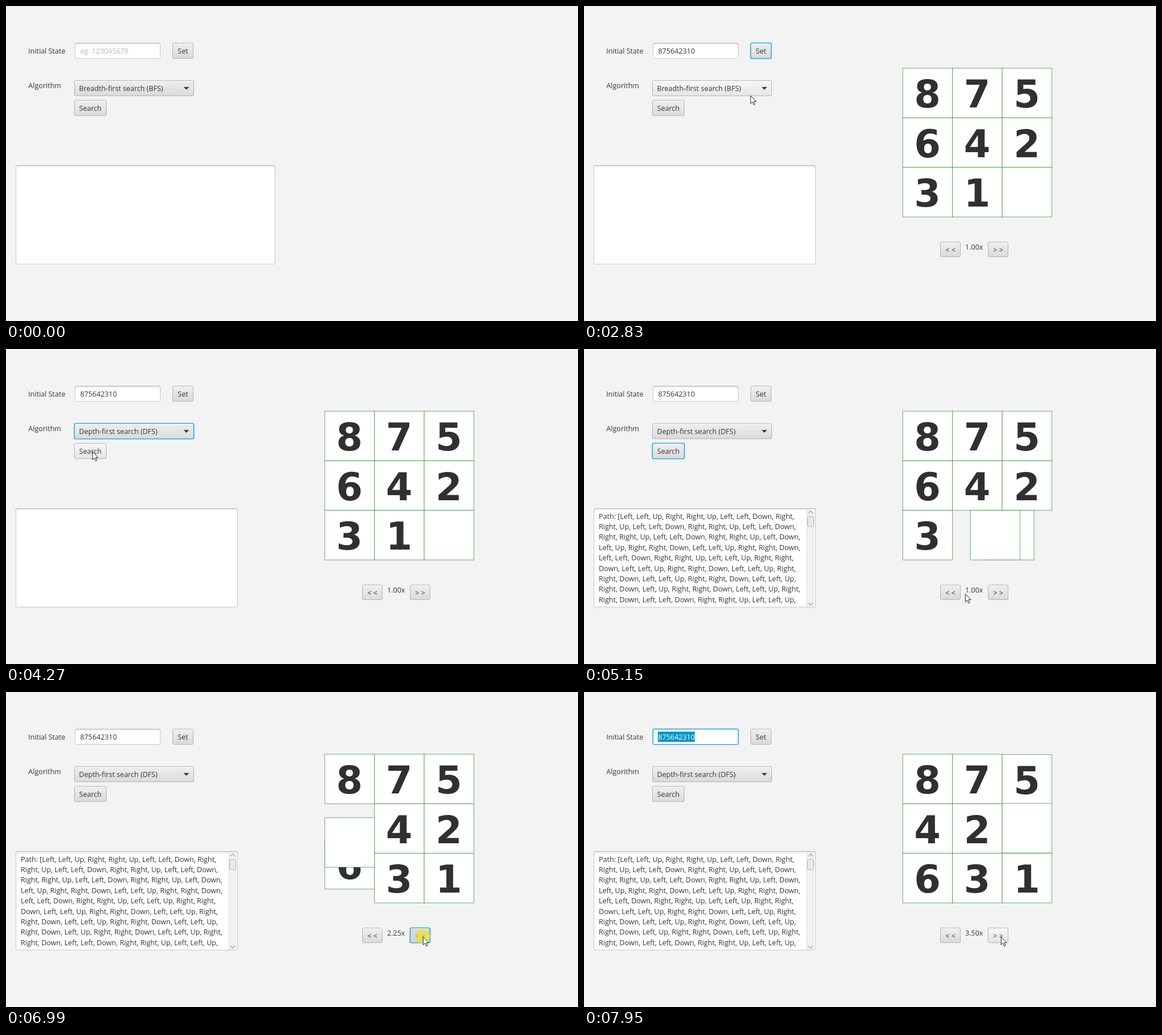
An HTML page with a canvas that plays this animation: 1007 px wide and 556 px high, repeating every 8000 ms.

```html
<!DOCTYPE html>
<html lang="en">
<head>
<meta charset="utf-8">
<title>8-puzzle solver</title>
<style>
html, body { margin: 0; width: 100%; height: 100%; overflow: hidden; background: #f3f3f3; }
canvas { display: block; }
</style>
</head>
<body>
<canvas id="stage" width="1007" height="556"></canvas>
<script>
const c = document.getElementById('stage').getContext('2d');
const LOOP = 8000, INK = '#353535', ACCENT = '#0096c9';
const UI = '"Open Sans", "Noto Sans", sans-serif';
const START = '875642310';
const ITEMS = ['Breadth-first search (BFS)', 'Depth-first search (DFS)', 'A* (Manhattan)', 'A* (Euclidean)'];
const PATH = `Path: [Left, Left, Up, Right, Right, Up, Left, Left, Down, Right,
Right, Up, Left, Left, Down, Right, Right, Up, Left, Left, Down,
Right, Right, Up, Left, Left, Down, Right, Right, Up, Left, Down,
Left, Up, Right, Right, Down, Left, Left, Up, Right, Right, Down,
Left, Left, Down, Right, Right, Up, Left, Left, Up, Right, Right,
Down, Left, Left, Up, Right, Right, Down, Left, Left, Up, Right,
Right, Down, Left, Left, Up, Right, Right, Down, Left, Left, Up,
Right, Down, Left, Up, Right, Right, Down, Left, Left, Up, Right,
Right, Down, Left, Left, Down, Right, Right, Up, Left, Left, Up,`.split('\n');

// time, x, y of the pointer tip
const POINTER = [
  [70, 667, 448], [620, 200, 78], [1170, 200, 78], [1650, 311, 79], [2200, 311, 79],
  [2440, 358, 112], [2830, 293, 158], [2990, 288, 153], [3150, 288, 153], [3630, 225, 196],
  [3950, 225, 196], [4270, 152, 181], [4670, 152, 181], [5150, 671, 432], [5470, 734, 432]
];
const PRESSES = [[700, 780], [1960, 2200], [3070, 3150], [3870, 3950], [4350, 4430],
  [5590, 5698], [6590, 6727], [6950, 7209]];
const FOCUS = [[0, ''], [700, 'field'], [1960, 'set'], [3070, 'combo'], [4350, 'search'],
  [5590, 'faster'], [7209, 'field']];
const SPEED = [[4354, 1], [5698, 1.5], [6727, 2.25], [7209, 3.5]];
const MOVE_MS = 1300, MOVES = [-1, -1, -3, 1, 1, -3];

const latest = (keys, t) => keys.filter(k => k[0] <= t).pop();

function pointerAt(t) {
  const i = POINTER.findIndex(k => k[0] > t);
  if (i < 0) return POINTER[POINTER.length - 1].slice(1);
  const [t0, x0, y0] = POINTER[i - 1], [t1, x1, y1] = POINTER[i];
  const p = (t - t0) / (t1 - t0), e = p * p * (3 - 2 * p);
  return [x0 + (x1 - x0) * e, y0 + (y1 - y0) * e];
}

// number of slides done, with fraction
function slides(t) {
  return SPEED.reduce((sum, [from, rate], i) => {
    const end = i + 1 < SPEED.length ? SPEED[i + 1][0] : Infinity;
    return sum + Math.max(0, Math.min(t, end) - from) * rate;
  }, 0) / MOVE_MS;
}

function easeBoth(p) {
  if (p < .2) return 3.125 * p * p;
  return p <= .8 ? 1.25 * p - .125 : 1 - 3.125 * (1 - p) ** 2;
}

function text(s, x, y, color = INK, align = 'left') {
  c.font = `12.57px ${UI}`;
  c.fillStyle = color;
  c.textAlign = align;
  c.fillText(s, x, y);
}

function round(x, y, w, h, r) {
  c.beginPath();
  c.roundRect(x, y, w, h, r);
}

function gradient(y, h, ...stops) {
  const g = c.createLinearGradient(0, y, 0, y + h);
  stops.forEach(([at, color]) => g.addColorStop(at, color));
  return g;
}

function outline(x, y, w, h, inset, width, color) {
  round(x + inset, y + inset, w - 2 * inset, h - 2 * inset, 3 - inset);
  c.strokeStyle = color;
  c.lineWidth = width;
  c.stroke();
}

function border(x, y, w, h, focused, color) {
  if (focused) {
    outline(x, y, w, h, -.8, 1, 'rgba(3,158,211,.14)');
    outline(x, y, w, h, .4, 1.4, '#1ba6d6');
  } else outline(x, y, w, h, .5, 1, color);
}

function button(x, y, w, h, label, focused, mouse) {
  const hover = mouse && mouse.x >= x && mouse.x <= x + w && mouse.y >= y && mouse.y <= y + h;
  const [top, bottom] = !hover ? ['#efefef', '#dadada'] : mouse.down ? ['#dcdcdc', '#d2d2d2'] : ['#f7f7f7', '#e5e5e5'];
  round(x, y, w, h, 3);
  c.fillStyle = gradient(y, h, [0, top], [1, bottom]);
  c.fill();
  c.fillStyle = 'rgba(255,255,255,.7)';
  c.fillRect(x + 2, y + 1, w - 4, 1);
  border(x, y, w, h, focused, '#b4b4b4');
  if (label) text(label, x + w / 2, y + 18.7, INK, 'center');
}

function input(x, y, w, h, focused) {
  round(x, y, w, h, 3);
  c.fillStyle = gradient(y, 5, [0, '#e4e4e4'], [1, '#fff']);
  c.fill();
  border(x, y, w, h, focused, gradient(y, 8, [0, '#b2b2b2'], [1, '#c8c8c8']));
}

function chevron(y, dir) {
  c.beginPath();
  c.moveTo(395, y + 2 * dir);
  c.lineTo(399, y - 2 * dir);
  c.lineTo(403, y + 2 * dir);
  c.strokeStyle = '#94aa97';
  c.lineWidth = 1.3;
  c.stroke();
}

function output() {
  PATH.forEach((line, i) => text(line, 26, 299.5 + 18.4 * i));
  c.fillStyle = '#f0f1f0';
  c.fillRect(392, 282, 14, 173);
  c.fillStyle = '#d9dbd9';
  c.fillRect(392, 282, 1, 173);
  round(393.5, 295.5, 11, 18, 2.5);
  c.fillStyle = '#e6ebe7';
  c.fill();
  c.strokeStyle = '#b0bbb2';
  c.lineWidth = 1;
  c.stroke();
  chevron(288, 1);
  chevron(450, -1);
}

function tile(col, row, digit) {
  const x = 561.2 + 87.5 * col, y = 109.8 + 87.5 * row;
  c.fillStyle = '#fff';
  c.fillRect(x, y, 87.5, 87.5);
  c.strokeStyle = 'rgba(0,128,0,.6)';
  c.lineWidth = 1;
  c.strokeRect(x, y, 87.5, 87.5);
  if (digit === '0') return;
  c.font = 'bold 67px "DejaVu Sans", Verdana, sans-serif';
  c.textAlign = 'center';
  c.fillStyle = '#303030';
  c.fillText(digit, x + 43.4, y + 69.2);
}

function board(t) {
  const cells = [...START], n = t < 4670 ? 0 : slides(t), done = Math.floor(n);
  let gap = 8;
  const place = i => [i % 3, Math.floor(i / 3)];
  for (const step of MOVES.slice(0, done)) {
    [cells[gap], cells[gap + step]] = [cells[gap + step], '0'];
    gap += step;
  }
  const next = gap + (MOVES[done] || 0), p = easeBoth(n - done);
  const [x0, y0] = place(gap), [x1, y1] = place(next);
  const dx = (x1 - x0) * p, dy = (y1 - y0) * p;
  cells.forEach((d, i) => {
    const [x, y] = place(i);
    if (i === next && i !== gap) tile(x - dx, y - dy, d);
    else if (i !== gap) tile(x, y, d);
  });
  tile(x0 + dx, y0 + dy, '0');
}

function popup(y) {
  c.save();
  c.shadowColor = 'rgba(0,0,0,.3)';
  c.shadowBlur = 8;
  c.shadowOffsetY = 2;
  c.fillStyle = '#fff';
  c.fillRect(120, 159, 210, 104);
  c.restore();
  c.strokeStyle = '#c4c4c4';
  c.lineWidth = 1;
  c.strokeRect(120.5, 159.5, 209, 103);
  const over = Math.floor((y - 160) / 25.5);
  ITEMS.forEach((item, i) => {
    const top = 160 + 25.5 * i;
    if (i === over) {
      c.fillStyle = ACCENT;
      c.fillRect(121, top, 208, 25.5);
    }
    text(item, 129, top + 17, i === over ? '#fff' : INK);
  });
}

function pointer(x, y) {
  c.save();
  c.translate(x, y);
  c.lineWidth = 1;
  c.strokeStyle = '#26262c';
  c.beginPath();
  if (x > 122 && x < 271 && y > 66 && y < 92) {
    [[-3, -8, 3, -8], [0, -8, 0, 8], [-3, 8, 3, 8]].forEach(([a, b, d, e]) => {
      c.moveTo(a + .5, b + .5);
      c.lineTo(d + .5, e + .5);
    });
  } else {
    [[0, 0], [0, 14], [3.2, 11], [5.6, 16.3], [7.8, 15.3], [5.5, 10.2], [9.8, 10.2]]
      .forEach(([a, b]) => c.lineTo(a + .3, b + .3));
    c.closePath();
    c.fillStyle = '#fff';
    c.fill();
  }
  c.stroke();
  c.restore();
}

function field(t, focused) {
  input(121, 65, 151, 28, focused);
  if (t < 700) text('eg. 123045678', 130.5, 84, '#b8b8b4');
  else if (t >= 7209) {
    c.fillStyle = ACCENT;
    c.fillRect(130, 70, 65, 18);
    text(START, 130.5, 84, '#fff');
  } else {
    if (t >= 1170) text(START, 130.5, 84);
    if (focused) {
      c.fillStyle = INK;
      c.fillRect(t >= 1170 ? 196 : 130, 71, 1, 17);
    }
  }
}

function draw(t) {
  const focus = latest(FOCUS, t)[1], solved = t >= 4670;
  const shown = t >= 70, [x, y] = shown ? pointerAt(t) : [0, 0];
  const down = PRESSES.some(([a, b]) => t >= a && t < b);
  const mouse = shown && { x, y, down };
  c.fillStyle = '#f3f3f3';
  c.fillRect(0, 0, 1007, 556);

  text('Initial State', 39.3, 84);
  text('Algorithm', 39.3, 145);
  field(t, focus === 'field');
  button(293, 65, 37, 28, 'Set', focus === 'set', mouse);
  const open = t >= 3150 && t < 3950;
  button(120, 131, 211, 28, '', focus === 'combo', mouse);
  text(ITEMS[t < 3950 ? 0 : 1], 128.5, 149.7);
  c.fillStyle = INK;
  c.beginPath();
  c.moveTo(312.7, 143);
  c.lineTo(322.3, 143);
  c.lineTo(317.5, 147.7);
  c.fill();
  button(120, 166, 57, 28, 'Search', focus === 'search', mouse);

  input(17, 281, t < 2040 ? 457 : 391, 175, false);
  if (solved) output();
  if (t >= 2040) {
    board(t);
    button(627, 416, 36, 27, '< <', false, mouse);
    button(711, 416, 36, 27, '> >', focus === 'faster', mouse);
    const speed = (latest(SPEED, t) || [0, 1])[1];
    text(speed.toFixed(2) + 'x', 686.7, 429.7, INK, 'center');
  }
  if (open) popup(y);
  if (down) {
    c.fillStyle = 'rgba(236,230,40,.68)';
    c.beginPath();
    c.arc(x, y - .5, 13, 0, 7);
    c.fill();
  }
  if (shown) pointer(Math.round(x), Math.round(y));
}

function stepped(t) {
  const offset = t < 1000 ? 70 : t < 1900 ? 50 : t < 2800 ? 40 : 30;
  return t < 70 ? 0 : Math.floor((t - offset) / 80) * 80 + offset;
}

const begin = performance.now();
function frame(now) {
  draw(stepped(Math.max(0, now - begin) % LOOP));
  requestAnimationFrame(frame);
}
frame(begin);
</script>
</body>
</html>
```
